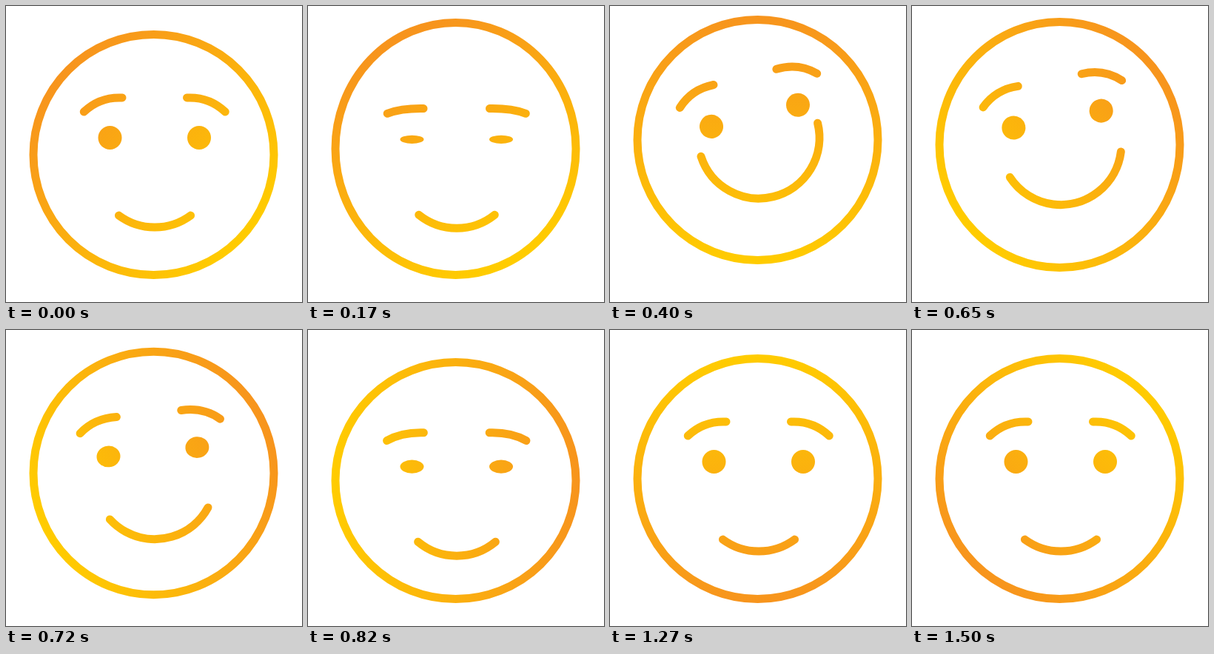
An HTML page with a canvas for the animation above (1.52 s loop, 400 px wide and 400 px high).

```html
<!DOCTYPE html>
<html lang="en">
<head>
<meta charset="utf-8">
<title>Nodding smile</title>
<style>
html, body { margin: 0; width: 100%; height: 100%; overflow: hidden; background: #fff; }
canvas { display: block; }
</style>
</head>
<body>
<canvas id="stage" width="400" height="400"></canvas>
<script>
const ctx = document.getElementById('stage').getContext('2d');
const LOOP = 1520;
const RAD = Math.PI / 180;

// time, head top, head bottom, eyes x, eyes y, tilt, eye openness, mouth y, mouth left and right sweep
const rest = [33, 369, 200.75, 178, 0, 1, 217, 36.3, 36.3];
const squash = [45, 377, 200.75, 191, 0, 0.1, 232, 41, 41];
const raised = [13, 349, 195.5, 148.3, -14, 1, 178, 72, 104];
const poses = [
  [0, ...rest],
  [110, ...squash],
  [170, 17, 369, 200.75, 180.5, 0, 0.35, 218.5, 38.7, 38.7],
  [350, ...raised],
  [540, ...raised],
  [650, 16, 359, 196.5, 153, -11, 1, 186.5, 57, 83],
  [820, 38, 369, 200.75, 184.5, 0, 0.57, 223, 39.7, 39.7],
  [910, ...squash],
  [1045, ...rest],
  [LOOP, ...rest]
];
// time, direction of the orange end in degrees
const turns = [[0, 222], [170, 243], [400, 270], [650, 318], [820, 360], [1050, 406], [1500, 490], [LOOP, 492]];

// Monotone cubic through the keys: rests at extremes, flows through the others
function sample(keys, t, col) {
  const last = keys.length - 1;
  const slope = i => (keys[i + 1][col] - keys[i][col]) / (keys[i + 1][0] - keys[i][0]);
  const tangent = i => {
    if (i <= 0 || i >= last) return 0;
    const a = slope(i - 1), b = slope(i);
    return a * b > 0 ? 2 * a * b / (a + b) : 0;
  };
  let i = 0;
  while (i < last - 1 && t >= keys[i + 1][0]) i++;
  const span = keys[i + 1][0] - keys[i][0];
  const u = (t - keys[i][0]) / span, v = 1 - u;
  return keys[i][col] * v * v * (1 + 2 * u) + keys[i + 1][col] * u * u * (3 - 2 * u)
    + span * u * v * (tangent(i) * v - tangent(i + 1) * u);
}

function linear(keys, t) {
  const i = keys.findIndex(key => key[0] > t);
  const [t0, a] = keys[i - 1], [t1, b] = keys[i];
  return a + (b - a) * (t - t0) / (t1 - t0);
}

function paint(angle, cy) {
  const x = 168 * Math.cos(angle * RAD), y = 168 * Math.sin(angle * RAD);
  const gradient = ctx.createLinearGradient(199.5 + x, cy + y, 199.5 - x, cy - y);
  gradient.addColorStop(0, '#f7941d');
  gradient.addColorStop(1, '#ffcc00');
  return gradient;
}

function draw(t) {
  const [top, bottom, eyeX, eyeY, tilt, open, mouthY, left, right] =
    rest.map((_, i) => sample(poses, t, i + 1));
  const cy = (top + bottom) / 2;
  ctx.fillStyle = '#fff';
  ctx.fillRect(0, 0, 400, 400);
  ctx.fillStyle = ctx.strokeStyle = paint(linear(turns, t), cy);
  ctx.lineWidth = 11;
  ctx.lineCap = 'round';

  ctx.beginPath();
  ctx.ellipse(199.5, cy, 162.5, (bottom - top) / 2 - 5.5, 0, 0, 2 * Math.PI);
  ctx.stroke();

  ctx.beginPath();
  ctx.arc(201, mouthY, 82, (90 - right) * RAD, (90 + left) * RAD);
  ctx.stroke();

  // Eyes and brows are placed in the tilted face, but painted unrotated
  const c = Math.cos(tilt * RAD), s = Math.sin(tilt * RAD);
  const place = (x, y) => [eyeX + x * c - y * s, eyeY + x * s + y * c];
  const shut = 1 - open;
  for (const side of [-1, 1]) {
    ctx.beginPath();
    ctx.ellipse(...place(side * 60.25, 0), 16, 16 * open, tilt * RAD, 0, 2 * Math.PI);
    ctx.fill();

    ctx.beginPath();
    ctx.moveTo(...place(side * (95.5 - 3 * shut), -35));
    ctx.quadraticCurveTo(
      ...place(side * 74, -35 - 20.5 * open),
      ...place(side * (43.75 + 1.5 * shut), -35 - 19 * open));
    ctx.stroke();
  }
}

function frame() {
  draw(performance.now() % LOOP);
  requestAnimationFrame(frame);
}
frame();
</script>
</body>
</html>
```
